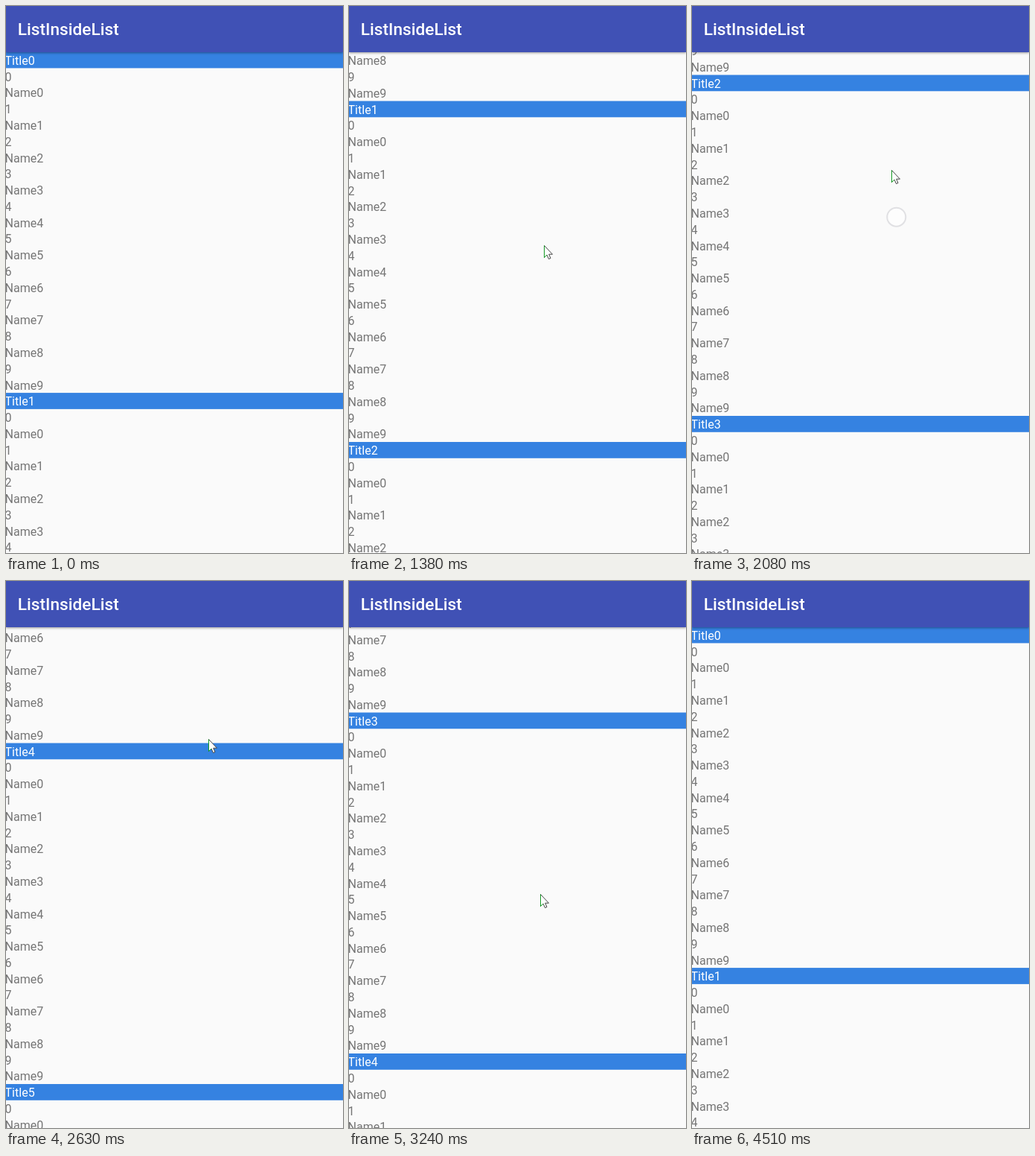
Recreate the animation shown at these times as an HTML page. Size 453 by 734 pixels, loop 4.81 s.

```html
<!DOCTYPE html>
<html lang="en">
<head>
<meta charset="utf-8">
<title>ListInsideList</title>
<style>
  html, body { margin: 0; width: 100%; height: 100%; overflow: hidden; background: #fafafa; }
  body { position: relative; font-family: Roboto, sans-serif; }
  header {
    position: absolute; z-index: 2; top: 0; left: 0; right: 0; height: 62px;
    padding-left: 15.8px; box-sizing: border-box;
    background: #4051b5; color: #fff; font-size: 22.65px; font-weight: 500; line-height: 63px;
    box-shadow: 0 1px 3px rgba(0, 0, 0, .4);
  }
  #list { transform-origin: 0 0; }
  #list div {
    height: 19px; line-height: 20px; font-size: 14px;
    text-indent: -1.3px; color: #757575; white-space: nowrap;
  }
  #list .title { background: #3582e1; color: #fff; }
  #glow {
    position: absolute; left: -60px; right: -60px; top: -8px; height: 115px;
    border-radius: 50%; background: #3f51b5;
  }
  svg { position: absolute; inset: 0; width: 100%; height: 100%; z-index: 3; }
</style>
</head>
<body>
<header>ListInsideList</header>
<div id="list"></div>
<div id="glow"></div>
<svg>
  <circle id="touch" r="12.5" fill="#fff" fill-opacity=".6" stroke="#e0e0e3" stroke-width="2"/>
  <g id="cursor">
    <path d="M.5 .5V16.5L4 13L6.5 18.5L9 17.5L6.7 12.2H11.5Z" fill="#fff" stroke="#444"/>
    <path d="M.5 .5V16.5L4 13" fill="none" stroke="#159a25"/>
  </g>
</svg>
<script>
const LOOP = 4810, STEP = 77.58;      // ms
const ENTER = -9, TOP_HIT = 42, END = 45, LAG = 1.15;   // steps
const SECTIONS = 7, ITEMS = 10;
const LIST_TOP = 61.6, SCALE = 457.5 / (2 * ITEMS + 1) / 19;

const $ = id => document.getElementById(id);
const list = $('list'), glow = $('glow'), touch = $('touch'), cursor = $('cursor');

// step, scroll offset
const scroll = [
  [0, 0], [2, 70], [5, 391.6], [7, 540], [10, 650], [14, 884.1], [17, 1190],
  [21, 1674.1], [23, 1795], [25, 1790], [29, 1257.6], [32, 890], [35, 663.9], [TOP_HIT, 0]
];

// Swipes as press and release: step, x, y
const swipes = [
  [[0, 261, 614], [5, 262, 321]],
  [[10, 285, 508], [14.1, 268, 219]],
  [[17.5, 273, 500], [21, 272, 212]],
  [[24.5, 266, 205], [29, 257, 420]],
  [[32, 300, 240], [35.1, 255, 515]],
  [[38, 268, 300], [40.5, 270, 520]]
];
const pointer = [[ENTER, 361, 679], [-3, 261, 615], ...swipes.flat(), [END - 1, 305, 585]];

const linear = p => p;
const smooth = p => p * p * (3 - 2 * p);

function at(keys, n, ease) {
  const i = keys.findIndex(k => k[0] > n);
  if (i <= 0) return keys.at(i).slice(1);
  const a = keys[i - 1], b = keys[i], p = ease((n - a[0]) / (b[0] - a[0]));
  return a.slice(1).map((v, j) => v + (b[j + 1] - v) * p);
}

function addRow(text, cls = '') {
  const row = document.createElement('div');
  row.textContent = text;
  row.className = cls;
  list.append(row);
}

for (let s = 0; s < SECTIONS; s++) {
  addRow('Title' + s, 'title');
  for (let i = 0; i < ITEMS; i++) {
    addRow(i);
    addRow('Name' + i);
  }
}

const show = (el, on) => el.setAttribute('visibility', on ? 'visible' : 'hidden');

// The screen refreshes in even steps, with a short rest before the first swipe
const stepAt = ms => ms < 900
  ? ENTER + Math.floor((ms - 270) / STEP)
  : Math.floor((ms - 990) / STEP);

function draw(ms) {
  const n = stepAt(ms);
  const [offset] = at(scroll, n, linear);
  list.style.transform = `translateY(${LIST_TOP - offset}px) scale(${SCALE})`;
  glow.style.opacity = n < TOP_HIT ? 0 : Math.max(0, .28 * (END - n) / (END - TOP_HIT));

  const [x, y] = at(pointer, n, smooth).map(Math.round);
  cursor.setAttribute('transform', `translate(${x} ${y})`);
  show(cursor, n >= ENTER && n < END);

  // The touch dot trails behind the pointer
  const swipe = swipes.find(([press, release]) => n >= press[0] && n < release[0]);
  show(touch, swipe);
  if (swipe) {
    const [cx, cy] = at(pointer, Math.max(n - LAG, swipe[0][0]), smooth);
    touch.setAttribute('cx', cx + 3);
    touch.setAttribute('cy', cy);
  }
}

const start = performance.now();
function tick() {
  draw((performance.now() - start) % LOOP);
  requestAnimationFrame(tick);
}
tick();
</script>
</body>
</html>
```
